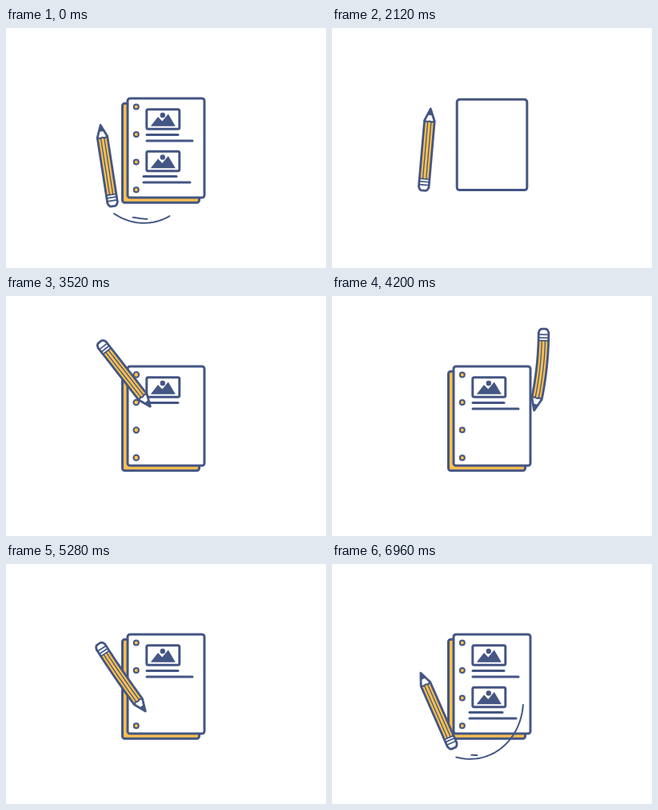
These frames come from a looping animation (400x300 px, 7000 ms). An HTML page with a canvas:

```html
<!DOCTYPE html>
<html lang="en">
<head>
<meta charset="utf-8">
<title>Pencil and notebook</title>
<style>
html, body { margin: 0; width: 100%; height: 100%; overflow: hidden; background: #fff; }
canvas { display: block; width: 400px; height: 300px; }
</style>
</head>
<body>
<canvas id="stage" width="400" height="300"></canvas>
<script>
const LOOP = 7000, INK = '#445684', GOLD = '#fdc04d';
const ctx = document.getElementById('stage').getContext('2d');

// Keyframe rows: time, then values
const placeKeys = [ // pencil centre
  [-40, 131.5, 183], [0, 126, 172], [120, 120, 160], [280, 123.5, 159.5],
  [640, 122.5, 160], [1800, 122.5, 160], [2240, 118, 146], [2440, 118, 116],
  [2600, 130, 92], [2760, 151, 88], [3240, 144, 93], [3440, 183, 93],
  [3520, 149, 98], [3800, 201, 100], [4160, 252, 92], [4400, 285, 98],
  [4720, 277.5, 105], [4960, 230, 112], [5200, 150, 140], [5480, 140, 144.5],
  [5720, 181, 144.5], [5920, 147, 150], [6280, 198, 152], [6560, 180, 158],
  [6720, 160, 172], [6840, 146, 182], [6960, 131.5, 183], [7000, 126, 172],
  [7120, 120, 160]
];
const turnKeys = [
  [-40, 66], [0, 81], [120, 97], [280, 87], [440, 91.5], [640, 90],
  [1800, 90], [2000, 82], [2240, 120], [2440, 180], [2600, 222], [2760, 241.5],
  [3240, 232], [3800, 232], [4160, 272], [4400, 295], [4720, 292], [4960, 262],
  [5400, 232], [6280, 232], [6400, 240], [6560, 275], [6720, 340], [6840, 385],
  [6960, 426], [7000, 441], [7120, 457]
];
const bendKeys = [
  [2240, 0], [2600, -8], [2760, -6], [2960, 2], [3240, 0], [3920, 0],
  [4160, 4], [4400, -6], [4600, 12], [4720, 10], [4960, -6], [5400, 0]
];
const pageKeys = [ // width, height, centre y, top radius
  [2050, 96, 124, 150, 3], [2440, 0, 0, 100, 8], [2520, 0, 0, 99, 8],
  [2760, 108, 76, 99, 8], [2860, 126, 84, 108, 8], [3000, 92, 144, 153, 5],
  [3200, 96, 124, 150, 3]
];
const tiltKeys = [[4240, 0], [4600, 11], [4720, 10.8], [5000, -2], [5160, 0]];
const backKeys = [[1800, 1], [2050, 0], [3240, 0], [3360, 1.5], [3500, 1]];
const ringKeys = [[1800, 1], [2050, 0], [3300, 0], [3460, 1.25], [3520, 1.12], [3640, 1]];
const photoA = [ // scale x, scale y, centre y
  [1800, 1, 1, 114], [2150, 0, 0, 100], [2690, 0, 0, 100],
  [2760, .12, .45, 100], [2900, 1.1, 1.1, 112], [3060, 1, 1, 114]
];
const photoB = [
  [1800, 1, 1, 166.5], [2100, 0, 0, 166.5], [5400, 0, 0, 166.5],
  [5600, 1.08, 1.08, 166.5], [5720, 1, 1, 166.5]
];
const lines = [ // x from, x to, y, start, end
  [176, 215, 133.5, 3240, 3440], [176, 233, 141, 3520, 3800],
  [172, 213, 185.5, 5480, 5720], [172, 230, 193, 5920, 6280]
];

const clamp = x => Math.min(1, Math.max(0, x));
const ramp = (t, a, b) => clamp((t - a) / (b - a));
const ease = (t, a, b) => { const p = ramp(t, a, b); return p * p * (3 - 2 * p); };

// Monotone cubic interpolation through the rows
function at(rows, t) {
  const last = rows.length - 1;
  if (t <= rows[0][0]) return rows[0].slice(1);
  if (t >= rows[last][0]) return rows[last].slice(1);
  const n = rows.findIndex(r => r[0] > t) - 1;
  const h = rows[n + 1][0] - rows[n][0], p = (t - rows[n][0]) / h;
  return rows[n].slice(1).map((v, j) => {
    const c = j + 1;
    const slope = i => (rows[i + 1][c] - rows[i][c]) / (rows[i + 1][0] - rows[i][0]);
    const tangent = i => {
      if (i === 0 || i === last) return 0;
      const a = slope(i - 1), b = slope(i);
      return a * b <= 0 ? 0 : 2 * a * b / (a + b);
    };
    const d = rows[n + 1][c] - v, q = p * p * (3 - 2 * p);
    return v + d * q + h * p * (1 - p) * ((1 - p) * tangent(n) - p * tangent(n + 1));
  });
}

function paint(fill, width) {
  if (fill) { ctx.fillStyle = fill; ctx.fill(); }
  if (width) { ctx.lineWidth = width; ctx.stroke(); }
}

function box(cx, cy, w, h, radius, fill, width) {
  ctx.beginPath();
  ctx.roundRect(cx - w / 2, cy - h / 2, w, h, radius);
  paint(fill, width);
}

function poly(points, fill, width, close) {
  ctx.beginPath();
  points.forEach(p => ctx.lineTo(p[0], p[1]));
  if (close) ctx.closePath();
  paint(fill, width);
}

function disc(x, y, r, fill, width) {
  ctx.beginPath();
  ctx.arc(x, y, r, 0, 2 * Math.PI);
  paint(fill, width);
}

function photo(rows, t) {
  const [sx, sy, y] = at(rows, t);
  if (sx < .02) return;
  box(196.3, y, 41 * sx, 24.5 * sy, 2 * sx, '#fff', 3 * Math.min(1, sy));
  if (sx < .3) return;
  ctx.save();
  ctx.translate(196.3, y);
  ctx.scale(sx, sy);
  poly([[-15.5, 8.8], [-6.3, -3], [-1, 2.5], [6.5, -6.5], [15.5, 8.8]], INK, 0, true);
  disc(-.5, -5, 3.2, INK);
  ctx.restore();
}

function notebook(t) {
  const [w, h, cy, r] = at(pageKeys, t);
  if (w < 1) return;
  const [back] = at(backKeys, t), [ring] = at(ringKeys, t);
  ctx.save();
  ctx.translate(200, 150);
  ctx.rotate(at(tiltKeys, t)[0] * Math.PI / 180);
  ctx.translate(-200, -150);
  if (back > .01) box(200 - 6.5 * back, cy + 6.3 * back, w, h, 3, GOLD, 3);
  box(200, cy, w, h, [r, r, 3, 3], '#fff', 3);
  if (ring > .02)
    for (let i = 0; i < 4; i++) disc(162.8, 98.4 + 34.6 * i, 3 * ring, GOLD, 2);
  photo(photoA, t);
  photo(photoB, t);
  for (const [x1, x2, y, from, to] of lines) {
    const p = Math.max(1 - ease(t, 1800, 2100), ease(t, from, to));
    if (p > .01) poly([[x1, y], [x1 + (x2 - x1) * p, y]], null, 3);
  }
  ctx.restore();
}

function pencil(t) {
  const [cx, cy] = at(placeKeys, t), [bend] = at(bendKeys, t);
  const half = 52, W = 6.3;
  // u runs from tip to eraser, v across; both follow the bent axis
  const map = ([u, v]) => {
    const k = u / half, s = -2 * bend * k / half, n = Math.hypot(1, s);
    return [u - v * s / n, bend * (1 - k * k) + v / n];
  };
  const run = (v, a, b) => Array.from({ length: 13 }, (_, i) => [a + (b - a) * i / 12, v]);
  const shape = (pts, fill, width, close) => poly(pts.map(map), fill, width, close);
  ctx.save();
  ctx.translate(cx, cy);
  ctx.rotate(at(turnKeys, t)[0] * Math.PI / 180);
  const outline = [[-51, 0], ...run(-W, -36, 47), [50, -5], [51.5, -3],
    [51.5, 3], [50, 5], ...run(W, 47, -36)];
  shape(outline, '#fff', 0, true);
  shape([...run(-W, -36, 37), ...run(W, 37, -36)], GOLD, 0, true);
  for (const v of [-2.1, 2.1]) shape(run(v, -35, 37), null, 1.3);
  shape([[-36, -W], [-34.5, -3], [-35.5, 0], [-34.5, 3], [-36, W]], null, 2);
  for (const u of [37, 40.5, 44.5]) shape([[u, -W], [u, W]], null, 1.7);
  shape([[-51, 0], [-43.5, -3], [-43.5, 3]], INK, 1, true);
  shape(outline, null, 2.8, true);
  ctx.restore();
}

// Part a..b of a cubic curve
function trail([p, q, r, s], a, b) {
  if (b - a < .01) return;
  poly(Array.from({ length: 33 }, (_, i) => {
    const k = a + (b - a) * i / 32, m = 1 - k;
    return [0, 1].map(c => m * m * m * p[c] + 3 * m * m * k * q[c] + 3 * m * k * k * r[c] + k * k * k * s[c]);
  }), null, 2);
}

const rise = [[101, 181], [45, 160], [45, 90], [85, 61]];
const riseInner = [[72, 112], [72, 100], [76, 90], [90, 68]];
const swing = [[239, 174], [236, 232], [180, 262], [135, 232]];
const swingInner = [[182, 239], [171, 239], [160, 237], [150, 235]];

function trails(t) {
  if (t > 2400 && t < 2900) {
    const head = ramp(t, 2400, 2600);
    if (head < 1) trail(rise, 0, head);
    else {
      trail(rise, 0, .6 * (1 - ramp(t, 2600, 2860)));
      trail(rise, .6 + .4 * ramp(t, 2600, 2778), 1);
    }
    trail(riseInner, ramp(t, 2640, 2860), ramp(t, 2560, 2800));
  }
  const u = t < 1000 ? t + LOOP : t;
  const tail = .48 * ramp(u, 6960, 7000) + .52 * ramp(u, 7000, 7100);
  trail(swing, tail, .85 * ramp(u, 6810, 6960) + .15 * ramp(u, 6960, 7000));
  trail(swingInner, ramp(u, 6956, 7220), ramp(u, 6942, 7024));
}

function frame(now) {
  const t = now % LOOP;
  ctx.fillStyle = '#fff';
  ctx.fillRect(0, 0, 400, 300);
  ctx.strokeStyle = INK;
  ctx.lineCap = ctx.lineJoin = 'round';
  notebook(t);
  pencil(t);
  trails(t);
  requestAnimationFrame(frame);
}
requestAnimationFrame(frame);
</script>
</body>
</html>
```
